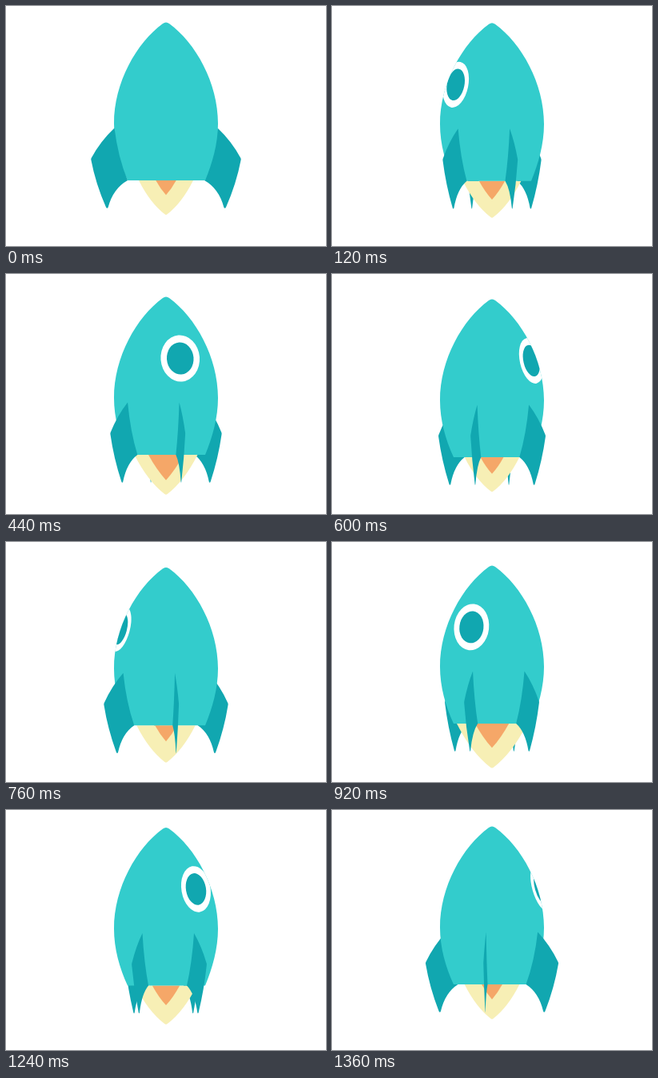
Write an HTML page that moves like this. It is 400 px wide and 300 px high and loops after 1400 ms.

```html
<!DOCTYPE html>
<html lang="en">
<head>
<meta charset="utf-8">
<title>Spinning rocket</title>
<style>
  html, body { margin: 0; width: 100%; height: 100%; overflow: hidden; background: #fff; }
  svg { display: block; width: 100vw; height: 100vh; }
  .hull { fill: #33cccc; }
  .fin, .glass { fill: #11a7b0; }
  .ring { fill: #fff; }
  .outer { fill: #f7efb5; }
  .inner { fill: #f5a768; }
</style>
</head>
<body>
<svg viewBox="0 0 400 300">
  <defs>
    <path id="hull" d="M-4 22Q0 19 4 22C37 46 65 96 65 147C65 172 58 196 49 218H-48C-58 196 -65 172 -65 147C-65 96 -37 46 -4 22Z"/>
    <path id="fin" d="M64.5 152.5Q82 169 93.3 190Q94 191 93.6 192.5Q88 222 75 251.5Q73.5 254 72.3 251.5Q66 228 48 218Q60 189 64.5 152.5Z"/>
    <clipPath id="clip"><use href="#hull"/></clipPath>
  </defs>
  <g id="rocket">
    <use class="fin back" href="#fin"/>
    <use class="fin back" href="#fin"/>
    <path class="outer" d="M-34 0Q-20 28 -1.5 42.3Q0 43.5 1.5 42.3Q20 28 34 0Z"/>
    <path class="inner" d="M-12.7 0Q-7 10.5 0 18.3Q7 10.5 12.7 0Z"/>
    <use class="hull" href="#hull"/>
    <g clip-path="url(#clip)">
      <g id="port">
        <circle class="ring" r="29"/>
        <circle class="glass" r="20"/>
      </g>
    </g>
    <use class="fin front" href="#fin"/>
    <use class="fin front" href="#fin"/>
  </g>
</svg>
<script>
const LOOP = 1400, STEP = 40, QUARTER = LOOP / 4, HALF = LOOP / 2;
const $ = s => document.querySelector(s);
const place = (el, tf) => el.setAttribute('transform', tf);

const rocket = $('#rocket'), port = $('#port');
const outer = $('.outer'), inner = $('.inner');
const front = document.querySelectorAll('.front');
const back = document.querySelectorAll('.back');

// Smooth rise and fall from 0 to 1 to 0 between two times
const pulse = (t, from, to) =>
  t < from || t > to ? 0 : Math.sin(Math.PI * (t - from) / (to - from)) ** 2;

function draw(t) {
  place(rocket, `translate(200 ${11.5 * pulse(t, 0, LOOP)})`);

  // Near fins drift right while far fins drift left
  const turn = t / QUARTER % 1;
  [turn - 1, turn].forEach((g, i) => {
    place(front[i], `scale(${g} 1)`);
    place(back[i], `scale(${-g} 1)`);
  });

  // The window crosses the hull twice per loop, p runs from -1 to 1
  const p = (t % HALF) / QUARTER - 1;
  const squash = Math.min(1, 1.03 - 0.745 * Math.abs(p));
  place(port, `translate(${69 * p} 97.5) rotate(${-18 * p}) scale(${squash} 1)`);

  const big = 1 + 0.23 * pulse(t, 0, 640) + 0.35 * pulse(t, 640, LOOP);
  const small = 1 + 0.9 * pulse(t % HALF, -10, HALF - 10);
  place(outer, `translate(0 218) scale(${big})`);
  place(inner, `translate(0 218) scale(${small})`);
}

function tick() {
  const t = performance.now() % LOOP;
  draw(Math.floor(t / STEP) * STEP);
  requestAnimationFrame(tick);
}
tick();
</script>
</body>
</html>
```
